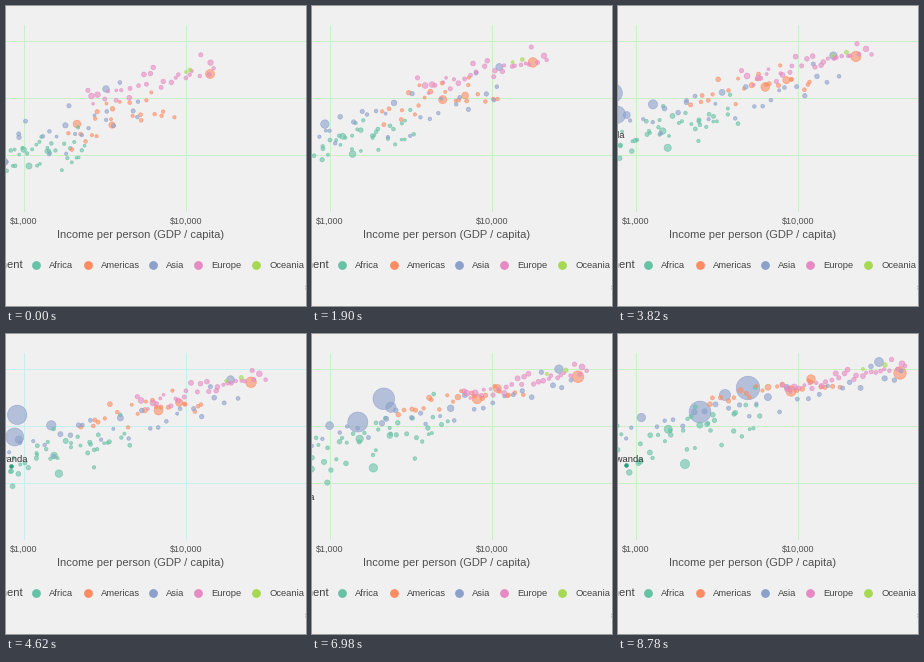
These frames come from a looping animation (300x300 px, 10 s). A matplotlib script:

```python
import numpy as np
import matplotlib.pyplot as plt
from matplotlib.animation import FuncAnimation
from matplotlib.colors import to_rgba

SIZE, DPI = 300, 100
FRAMES, STEP = 500, 20
LAST = 439                     # motion ends here, then the picture rests
BACK = "#f0f0f0"
GREEN_GRID, BLUE_GRID = "#c9efc9", "#c6eff0"
INK, SOFT = "#444444", "#505050"

# Each cloud: colour, count, population growth,
# then at start and end: centre x, y, half width, rise to the right, scatter
CLOUDS = {
    "Africa": ("#66c2a5", 50, 3.4, (18, 150, 62, 8, 11), (50, 105, 95, 28, 15)),
    "Americas": ("#fc8d62", 22, 2.4, (112, 110, 52, 14, 16), (155, 56, 65, 8, 5)),
    "Asia": ("#8da0cb", 29, 2.5, (50, 126, 88, 18, 15), (140, 69, 145, 27, 7)),
    "Europe": ("#e78ac3", 29, 1.3, (145, 76, 65, 17, 6), (226, 43, 62, 13, 3)),
    "Oceania": ("#a6d854", 2, 2.2, (182, 65, 2, 1, 0), (256, 33, 11, 2, 0)),
}

# Largest bubbles: continent, start, end, bend of the x path, final population
GIANTS = [
    ("Asia", (-46, 138), (130, 54), 1.75, 1318),
    ("Asia", (-25, 156), (82, 78), 1.8, 1110),
    ("Asia", (-2, 156), (107, 61), 1.3, 223),
    ("Asia", (100, 83), (261, 28), 0.4, 127),
    ("Americas", (204, 68), (282, 39), 1.0, 301),
    ("Americas", (71, 118), (173, 57), 0.35, 190),
    ("Americas", (106, 119), (193, 45), 0.4, 109),
    ("Africa", (23, 160), (67, 130), 0.6, 135),
]

# Path of the labelled country: time in five-year steps, x, y
RWANDA = np.array([(0, -32, 149), (5, -10, 135), (6, 9, 131), (7, 6, 138),
                   (8, -3, 196), (9, -19, 160), (10, 1, 139), (11, 8, 131)])


def px(n):
    return n * 72 / DPI


def marker_area(pop):
    return px(2 * (1.2 + 0.29 * np.sqrt(pop))) ** 2


def lerp(a, b, p):
    return a + (b - a) * p


class Cloud:
    def __init__(self, rng, color, count, growth, start, end):
        self.color, self.count, self.growth = color, count, growth
        self.start, self.end = np.array(start), np.array(end)
        self.rank = np.linspace(-1, 1, count)
        self.lean = rng.normal(size=count)
        self.phase = rng.uniform(0, 2 * np.pi, count)
        self.pop = np.exp(rng.normal(2.2, 0.9, count))

    def at(self, p):
        x, y, width, rise, scatter = lerp(self.start, self.end, p ** 0.75)
        sway = np.sin(self.phase + 7 * p)
        return np.column_stack([
            x + width * self.rank + 0.4 * scatter * sway,
            y - rise * self.rank + scatter * (0.9 * self.lean + 0.3 * sway)])


rng = np.random.default_rng(12)
clouds = [Cloud(rng, *spec) for spec in CLOUDS.values()]
START, END = (np.array([g[i] for g in GIANTS]) for i in (1, 2))
BENDS = np.array([(g[3], 0.6) for g in GIANTS])

TINTS = [CLOUDS[g[0]][0] for g in GIANTS]
TINTS += [c.color for c in clouds for _ in range(c.count)]
POPS = np.concatenate([[g[4] for g in GIANTS]] + [c.pop for c in clouds])
GROWTH = np.concatenate([[CLOUDS[g[0]][2] for g in GIANTS]]
                        + [np.full(c.count, c.growth) for c in clouds])


def places(p):
    giants = lerp(START, END, p ** BENDS)
    return np.concatenate([giants] + [c.at(p) for c in clouds])


plt.rcParams["font.family"] = "Liberation Sans"
fig = plt.figure(figsize=(SIZE / DPI, SIZE / DPI), dpi=DPI, facecolor=BACK)
ax = fig.add_axes([0, 0, 1, 1])
ax.set_xlim(0, SIZE)
ax.set_ylim(SIZE, 0)
ax.axis("off")


def write(x, y, s, size, color=SOFT, ha="left"):
    return ax.text(x, y, s, fontsize=px(size), color=color, ha=ha,
                   va="center_baseline", clip_on=True, zorder=4)


grid = [ax.plot([-1, SIZE + 1], [y, y], lw=px(1), zorder=1)[0]
        for y in (35, 92, 149)]
grid += [ax.plot([x, x], [19, 205], lw=px(1), zorder=1)[0]
         for x in (18, 180)]

write(17.8, 214.5, "$1,000", 9, ha="center")
write(180.3, 214.5, "$10,000", 9, ha="center")
write(134.5, 228.5, "Income per person (GDP / capita)", 11.1, ha="center")
write(17.5, 258.5, "continent", 11.1, INK, "right")
for dot, (name, spec) in zip((30.3, 82, 147, 192, 250), CLOUDS.items()):
    ax.scatter([dot], [258.7], s=px(8.8) ** 2, color=spec[0], lw=0, zorder=3)
    write(dot + 13, 258.5, name, 9.4, INK)
write(298.3, 282, "Source", 8, INK)

bubbles = ax.scatter(*places(0).T, s=marker_area(POPS / GROWTH),
                     facecolors=[to_rgba(c, 0.6) for c in TINTS],
                     edgecolors=[to_rgba(c, 0.7) for c in TINTS],
                     linewidths=px(0.7), zorder=2)
marked = ax.scatter([0], [0], s=marker_area(6), color="#2a9f7c",
                    linewidths=px(0.6), zorder=3)
label = write(0, 0, "Rwanda", 9.4, "#333333", "center")


def draw(k):
    p = min(k, LAST) / LAST
    bubbles.set_offsets(places(p))
    bubbles.set_sizes(marker_area(POPS * GROWTH ** (p - 1)))

    x, y = (np.interp(11 * p, RWANDA[:, 0], RWANDA[:, i]) for i in (1, 2))
    marked.set_offsets([(x, y)])
    label.set_position((x, y - 7))

    tone = BLUE_GRID if 4100 <= k * STEP <= 5100 else GREEN_GRID
    for line in grid:
        line.set_color(tone)
    return [bubbles, marked, label, *grid]


anim = FuncAnimation(fig, draw, frames=FRAMES, interval=STEP,
                     init_func=lambda: draw(0), repeat=True, repeat_delay=0)
plt.show()
```
